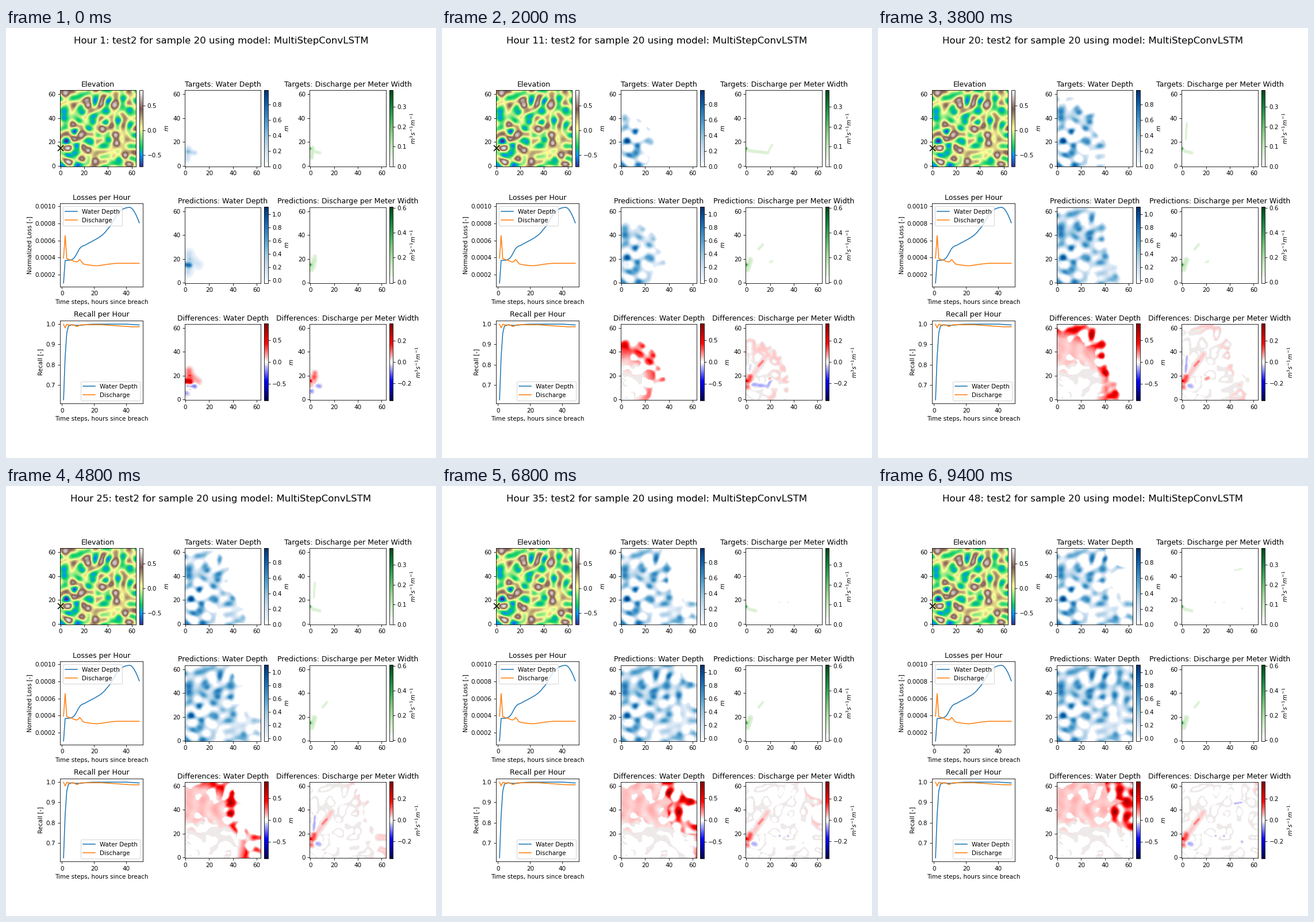
Animation of 748x748 px, one loop 9.6 s. Source, as a matplotlib script:

```python
import numpy as np
import matplotlib.pyplot as plt
from matplotlib.animation import FuncAnimation
from matplotlib.colors import ListedColormap

plt.rcParams["font.family"] = "DejaVu Sans"

HOURS = 48
N = 64
Y, X = np.mgrid[0:N, 0:N].astype(float)


def ramp(v):
    return np.clip(v, 0, 1)


def bell(v, center, width):
    return np.exp(-((v - center) / width) ** 2 / 2)


def ridge(x0, y0, x1, y1, s):
    """Gaussian falloff around a line segment."""
    dx, dy = x1 - x0, y1 - y0
    u = ramp(((X - x0) * dx + (Y - y0) * dy) / max(dx * dx + dy * dy, 1e-9))
    return bell(np.hypot(X - x0 - u * dx, Y - y0 - u * dy), 0, s)


def spot(x, y, s):
    return ridge(x, y, x, y, s)


def smooth_noise(seed, std):
    """Random plane waves of similar length."""
    rng = np.random.default_rng(seed)
    field = np.zeros((N, N))
    for _ in range(60):
        angle, phase = rng.uniform(0, 2 * np.pi, 2)
        k = 2 * np.pi / rng.uniform(8.5, 13)
        field += np.cos(k * (X * np.cos(angle) + Y * np.sin(angle)) + phase)
    return field * std / field.std()


# ---- terrain: main hills and pits over noise ----
HILLS = [(4, 61), (17, 26), (23, 51), (23, 13), (29, 4), (35, 31), (45, 51),
         (46, 26), (47, 19), (54, 9)]
PITS = [(3, 40), (3, 46), (12, 11), (18, 45), (25, 20), (27, 37), (38, 46),
        (40, 22), (49, 5), (58, 47)]


def make_elevation():
    total, cover = np.zeros((N, N)), np.zeros((N, N))
    for points, height in ((HILLS, .7), (PITS, -.5)):
        for x, y in points:
            total += height * spot(x, y, 2.4)
            cover += spot(x, y, 3)
    return np.clip(total + smooth_noise(20, .26) * (1 - ramp(cover)), -.733, .812)


ELEV = make_elevation()
VALLEY = np.exp(-(ELEV + .15) ** 2 / .06)

# ---- flood arrival hours: distance from the breach plus a slow north-east ----
DIST = np.hypot(X, Y - 15)
SLOW = ramp((X - 32) / 26) * ramp((Y - 18) / 14) * (1 - .65 * bell(Y, 47, 3))
T_TARGET = .12 * DIST ** 1.35 + 45 * SLOW
T_MODEL = .07 * DIST ** 1.4 + 15 * SLOW

FULL_LEVEL = .18
EXTRA = .02 + .08 * ramp((Y - 15) / 20) + smooth_noise(7, .018)
SPECKLE = smooth_noise(3, .1) * np.cos(2 * X) * np.cos(2 * Y) * (X < 5) * bell(Y, 13, 5)

TARGET_PLUME = .22 * ridge(1, 6, 2, 14, 2) + .25 * ridge(2, 12, 8, 11, 1.3)
MODEL_PLUME = (.65 * ridge(0, 15, 4, 14.5, 1.5) + .25 * ridge(2, 9, 3, 24, 2.1)
               + .16 * ridge(6, 19, 11, 15, 1.9))
MODEL_JET = .42 * spot(0, 15, .9) + .13 * ridge(1, 11, 3.5, 19, 1.8)
CORRIDOR = .04 * ridge(2, 15, 18, 38, 1.9)


def during(t, start, end=99):
    return ramp((t - start) / 2) * ramp((end - t) / 2)


def depth(t, arrive, full):
    wet = ramp((t - arrive) / 5) ** .6
    level = -.3 + (full + .3) * wet
    return np.where(wet > 0, np.maximum(level - ELEV, 0), 0)


def target_flow(t):
    reach = during(t, 1, 15)
    parts = [
        .3 * spot(0, 14.5, .9),
        .07 * ridge(0, 13, 8 + 10 * reach, 11, 1.3),
        .09 * during(t, -9, 4) * ridge(1, 7, 2, 15, 1.5),
        .07 * during(t, 4, 13) * ridge(18, 11, 22, 18, .8),
        .07 * during(t, 10, 35) * ridge(3, 22, 4, 36 - 6 * ramp((t - 24) / 4), .8),
        .07 * during(t, 25, 35) * ridge(10.5, 51, 11, 56, .8),
        .07 * during(t, 25) * (spot(28, 18, .8) + spot(35, 18, .8)),
        .07 * during(t, 42) * (spot(50, 13, .9) + ridge(44, 45, 50, 46, .6)),
    ]
    return np.maximum.reduce(parts)


def model_flow(t):
    late = t - T_MODEL
    parts = [
        MODEL_JET,
        .1 * during(t, -9, 4) * ridge(3, 13, 4, 22, 1.5),
        .1 * during(t, 3) * ridge(10.5, 28, 14, 32, .9),
        .09 * during(t, 4, 24) * ridge(20, 17, 22, 18, .9),
        .042 * np.exp(-(late / 10) ** 2) * ramp(late) * VALLEY,
        .014 * ramp(late / 4) * VALLEY,
        CORRIDOR * ramp((t - 6) / 6),
    ]
    return np.maximum.reduce(parts)


def fields(t):
    fade = np.exp(-(t - 1) / 3)
    water = np.maximum(depth(t, T_TARGET, FULL_LEVEL), TARGET_PLUME * fade)
    model = np.maximum(depth(t, T_MODEL, FULL_LEVEL + EXTRA), MODEL_PLUME * fade)
    model = np.maximum(model + SPECKLE * ramp((t - 9) / 4), 0)
    flow, model_q = target_flow(t), model_flow(t)
    return water, flow, model, model_q, model - water, model_q - flow


# ---- colour maps with a white floor ----
def floored(name, floor):
    colors = plt.get_cmap(name)(np.linspace(0, 1, 256))
    colors[:int(floor * 256)] = 1
    return ListedColormap(colors)


def pale_seismic():
    s = np.linspace(-1, 1, 256)
    colors = plt.get_cmap("seismic")(np.linspace(0, 1, 256))
    colors[abs(s) < .07] = (.94, .92, .92, 1)
    colors[abs(s) < .03] = 1
    return ListedColormap(colors)


BLUES, GREENS, SEISMIC = floored("Blues", .05), floored("Greens", .09), pale_seismic()

# ---- figure ----
fig, axes = plt.subplots(3, 3, figsize=(10, 10), dpi=74.8)
fig.subplots_adjust(left=.125, right=.9, bottom=.11, top=.88, wspace=.5, hspace=.2)
heading = fig.suptitle("", fontsize=16)
DEPTH_UNIT, FLOW_UNIT = "$m$", "$m^3s^{-1}m^{-1}$"


def show_map(ax, title, data, cmap, low, high, unit):
    im = ax.imshow(data, origin="lower", cmap=cmap, vmin=low, vmax=high)
    ax.set_title(title)
    ax.set_xticks(range(0, 61, 20))
    ax.set_yticks(range(0, 61, 20))
    fig.colorbar(im, ax=ax, fraction=.046, pad=.04, label=unit)
    return im


def show_curves(ax, title, ylabel, loc, water, discharge):
    ax.plot(h, water, label="Water Depth")
    ax.plot(h, discharge, label="Discharge")
    ax.set_box_aspect(1)
    ax.set_title(title)
    ax.set_xlabel("Time steps, hours since breach")
    ax.set_ylabel(ylabel)
    ax.legend(loc=loc)


show_map(axes[0, 0], "Elevation", ELEV, "terrain", -.733, .812, DEPTH_UNIT)
axes[0, 0].plot([0], [15], "kx", ms=10, mew=1.5, clip_on=False, zorder=5)
axes[0, 0].set(xlim=(-.5, N - .5), ylim=(-.5, N - .5))

h = np.arange(1, HOURS + 1)


def step(center, width):
    return 1 / (1 + np.exp((center - h) / width))


water_loss = (365 - 265 * (h == 1) + 180 * step(9.5, 1.2) + 130 * ramp((h - 14) / 14)
              + 320 * step(32, 2.4) - 187 * ramp((h - 42) / 6) ** 1.7)
flow_loss = (312 + 75 * np.exp(-((h - 1) / 9) ** 2) + 272 * bell(h, 2, .35)
             + 45 * bell(h, 11.2, .8) - 9 * bell(h, 22, 4) + 20 * ramp((h - 22) / 12))
show_curves(axes[1, 0], "Losses per Hour", "Normalized Loss [-]", "upper left",
            water_loss * 1e-6, flow_loss * 1e-6)

water_recall = (1 - .373 * np.exp(-.85 * (h - 1) ** 1.35) - .006 * bell(h, 10, 4)
                - .004 * ramp((h - 40) / 8))
flow_recall = (1 - .018 * (h == 2) - .007 * bell(h, 5, .5) - .009 * bell(h, 9.3, 1)
               - .003 * ramp(h / 10) - .01 * ramp((h - 25) / 18))
show_curves(axes[2, 0], "Recall per Hour", "Recall [-]", "lower right",
            water_recall, flow_recall)

blank = np.zeros((N, N))
PANELS = [
    ("Targets: ", BLUES, 0, .982, GREENS, 0, .385),
    ("Predictions: ", BLUES, -.043, 1.108, GREENS, -.0117, .609),
    ("Differences: ", SEISMIC, -.883, .883, SEISMIC, -.356, .356),
]
images = []
for row, (kind, cmap_d, lo_d, hi_d, cmap_q, lo_q, hi_q) in zip(axes, PANELS):
    images.append(show_map(row[1], kind + "Water Depth", blank,
                           cmap_d, lo_d, hi_d, DEPTH_UNIT))
    images.append(show_map(row[2], kind + "Discharge per Meter Width", blank,
                           cmap_q, lo_q, hi_q, FLOW_UNIT))


def update(i):
    hour = i + 1
    heading.set_text(f"Hour {hour}: test2 for sample 20 using model: MultiStepConvLSTM")
    for im, data in zip(images, fields(hour)):
        im.set_data(data)
    return [heading, *images]


anim = FuncAnimation(fig, update, frames=HOURS, interval=200, repeat=True)
plt.show()
```
